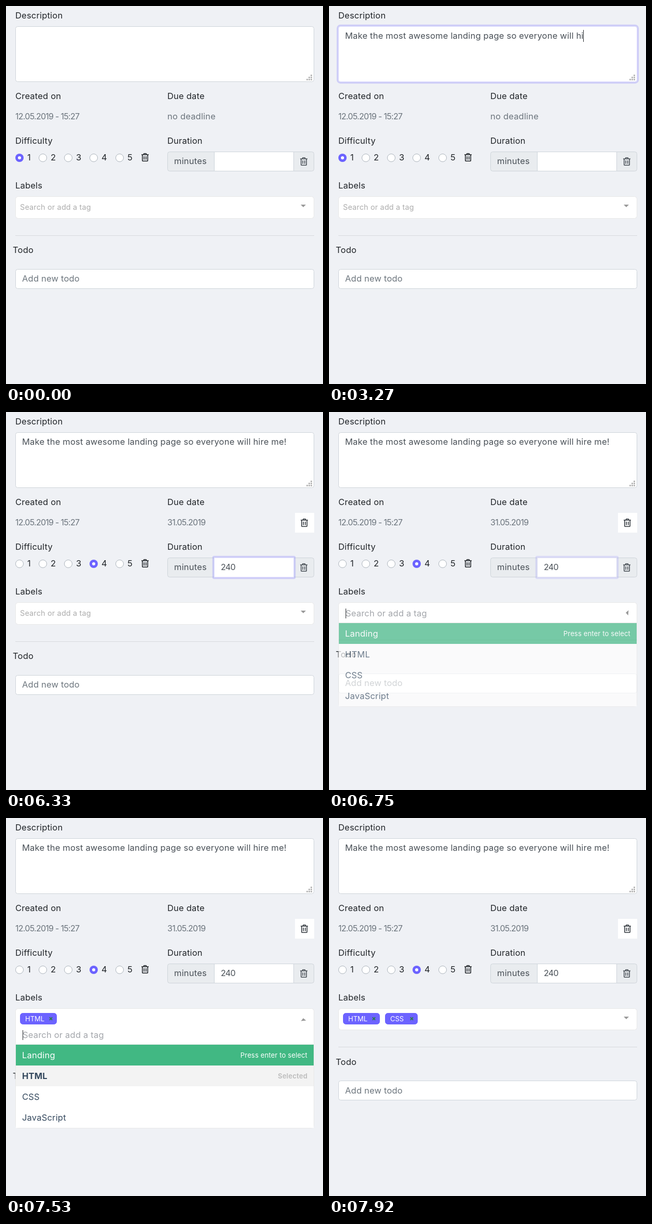
Write an HTML page with a canvas that moves like this. It is 611 px wide and 727 px high and loops after 8000 ms.

```html
<!DOCTYPE html>
<html lang="en">
<head>
<meta charset="utf-8">
<title>Task form</title>
<style>
  html, body { margin: 0; width: 100%; height: 100%; overflow: hidden; background: #eff1f5; }
  canvas { display: block; }
</style>
</head>
<body>
<canvas width="611" height="727"></canvas>
<script>
const page = document.querySelector('canvas').getContext('2d');
const layer = page.canvas.cloneNode().getContext('2d');
let ctx = page;

const LOOP = 8000;
const DARK = '#212529', INK = '#495057', MUTED = '#6c757d', LINE = '#ced4da', ACCENT = '#6c63ff';
const NOTE = 'Make the most awesome landing page so everyone will hire me!';
// [ms, characters typed]
const TYPING = [[240, 0], [1020, 13], [1500, 22], [1860, 29], [2670, 45], [3270, 54], [3510, 59], [3600, 60]];
const OPTIONS = ['Landing', 'HTML', 'CSS', 'JavaScript'];
const LABEL_X = 18, RIGHT_X = 311;

const clamp = x => Math.max(0, Math.min(1, x));
const smooth = x => x * x * (3 - 2 * x);
const during = (t, a, b) => t >= a && t < b;
const fade = (t, on, off, ms = 150, curve = smooth) =>
  curve(clamp((t - on) / ms)) * (1 - curve(clamp((t - off) / ms)));

// the CSS "ease" curve, cubic-bezier(.25, .1, .25, 1)
function ease(x) {
  let s = x;
  for (let i = 0; i < 6; i++) s -= (0.75 * s * (1 - s) + s ** 3 - x) / (0.75 - 1.5 * s + 3 * s * s);
  return 0.3 * s * (1 - s) ** 2 + 3 * s * s * (1 - s) + s ** 3;
}

function text(s, x, y, color = DARK, { size = 16.5, weight = 400, gap = 0.012, align = 'left' } = {}) {
  ctx.font = `${weight} ${size}px Inter, "Open Sans", sans-serif`;
  ctx.letterSpacing = gap * size + 'px';
  ctx.textAlign = align;
  ctx.fillStyle = color;
  ctx.fillText(s, x, y);
  return ctx.measureText(s).width;
}

const digits = (s, x, y, color) => text(s, x, y, color, { size: 16, gap: -0.045 });

function rect(x, y, w, h, color) {
  ctx.fillStyle = color;
  ctx.fillRect(x, y, w, h);
}

function box(x, y, w, h, fill, stroke, r = 4) {
  ctx.beginPath();
  ctx.roundRect(x + 0.5, y + 0.5, w - 1, h - 1, r);
  ctx.fillStyle = fill;
  ctx.fill();
  ctx.lineWidth = 1;
  ctx.strokeStyle = stroke;
  ctx.stroke();
}

// draws a group on its own layer, then blends it as one
function withAlpha(alpha, draw) {
  if (alpha <= 0) return;
  ctx = layer;
  ctx.clearRect(0, 0, 611, 727);
  draw();
  ctx = page;
  ctx.globalAlpha = alpha;
  ctx.drawImage(layer.canvas, 0, 0);
  ctx.globalAlpha = 1;
}

function focusBox(x, y, w, h, amount, r = 4) {
  withAlpha(amount, () => {
    box(x, y, w, h, '#fff', '#e3e2ff', r);
    ctx.beginPath();
    ctx.roundRect(x - 1.6, y - 1.6, w + 3.2, h + 3.2, r + 1.6);
    ctx.lineWidth = 3.2;
    ctx.strokeStyle = 'rgba(108,99,255,.25)';
    ctx.stroke();
  });
}

function disc(x, y, r, color) {
  ctx.beginPath();
  ctx.arc(x, y, r, 0, 7);
  ctx.fillStyle = color;
  ctx.fill();
}

function shape(points, color) {
  ctx.beginPath();
  points.forEach(p => ctx.lineTo(...p));
  ctx.fillStyle = color;
  ctx.fill();
}

function trash(x, y, color) {
  ctx.save();
  ctx.translate(x, y);
  ctx.strokeStyle = color;
  ctx.lineWidth = 1.6;
  ctx.stroke(new Path2D('M-7-5H7M-3-5.2L-2-7.3H2L3-5.2M-5.2-5V6.2Q-5.2 7.2-4.2 7.2H4.2Q5.2 7.2 5.2 6.2V-5M-1.8-2V4.5M1.8-2V4.5'));
  ctx.restore();
}

function typed(t) {
  const i = TYPING.findIndex(p => p[0] > t);
  if (i < 0) return NOTE.length;
  if (i === 0) return 0;
  const [[t0, n0], [t1, n1]] = [TYPING[i - 1], TYPING[i]];
  return Math.floor(n0 + (n1 - n0) * (t - t0) / (t1 - t0) + 0.001);
}

function description(t) {
  text('Description', LABEL_X, 24);
  box(18, 39, 576, 107, '#fff', LINE);
  focusBox(18, 39, 576, 107, fade(t, 180, 4110) * (t >= 240));
  for (let row = 0; row < 3; row++)
    for (let col = 2 - row; col < 3; col++) rect(579 + col * 4, 132 + row * 4, 3, 3, '#b9b9b9');
  const width = text(NOTE.slice(0, typed(t)), 31, 63, INK);
  if (during(t, 240, 3600) || during(t, 3690, 3900)) rect(Math.floor(31 + width), 46, 1, 23, DARK);
}

function dates(t) {
  const picked = t >= 4680;
  text('Created on', LABEL_X, 179);
  digits('12.05.2019 - 15:27', LABEL_X, 218, MUTED);
  text('Due date', RIGHT_X, 179);
  focusBox(RIGHT_X, 194, picked ? 246 : 283, 38, fade(t, 4110, 5250));
  if (!picked) return text('no deadline', RIGHT_X, 218, MUTED);
  digits('31.05.2019', RIGHT_X, 218, MUTED);
  rect(557, 194, 37, 38, '#fff');
  trash(575, 213, '#343a40');
}

function difficulty(t) {
  const chosen = t < 5250 ? 0 : 3;
  text('Difficulty', LABEL_X, 265);
  [26, 71, 120, 169, 219].forEach((x, i) => {
    if (i === 3) focusBox(x - 8, 284, 16, 16, fade(t, 5250, 5730), 8);
    if (i === chosen) {
      disc(x, 292, 8, ACCENT);
      disc(x, 292, 3, '#fff');
    } else box(x - 8, 284, 16, 16, '#fff', '#adb5bd', 7.5);
    text(i + 1, x + 15, 297);
  });
  trash(268, 291, DARK);
}

function duration(t) {
  text('Duration', RIGHT_X, 265);
  box(311, 280, 283, 38, '#e9ecef', LINE);
  box(401, 280, 154, 38, '#fff', LINE, 0);
  text('minutes', 324, 304, INK);
  trash(574, 299, INK);
  focusBox(401, 280, 154, 38, fade(t, 5730, 6690), 0);
  const count = t < 5940 ? 0 : Math.min(3, 1 + Math.floor((t - 5940) / 120));
  const width = digits('240'.slice(0, count), 414, 304, INK);
  if (during(t, 5730, 6330) || during(t, 6540, 6690)) rect(Math.round(414 + width), 287, 1, 23, DARK);
}

function calendar(t) {
  if (!during(t, 4110, 4680)) return;
  const cell = 298 / 7, left = 312, top = 233;
  rect(311, 232, 300, 282, '#ccc');
  rect(312, 233, 298, 280, '#fff');
  text('May 2019', 461, top + 25, DARK, { align: 'center' });
  shape([[327, 253], [337, 247], [337, 259]], '#000');
  shape([[595, 253], [585, 247], [585, 259]], '#000');
  ['Sun', 'Mon', 'Tue', 'Wed', 'Thu', 'Fri', 'Sat'].forEach((d, i) =>
    text(d, left + cell * (i + 0.5), top + 64, DARK, { size: 12, align: 'center' }));
  // the pointer glides from the field down to the last day
  const k = clamp((t - 4150) / 290), px = 430 + 116 * k, py = 230 + 263 * k;
  for (let day = 1; day <= 31; day++) {
    const x = left + (day + 2) % 7 * cell, y = top + 80 + Math.floor((day + 2) / 7) * 40;
    if (during(px, x, x + cell) && during(py, y, y + 40)) box(Math.round(x), y, 43, 40, '#fff', '#4bd', 0);
    text(day, x + cell / 2, y + 26, DARK, { size: 16, align: 'center', gap: -0.03 });
  }
}

function tag(name, x, w) {
  box(x, 375, w, 22, ACCENT, ACCENT, 5);
  text(name, x + 10, 391, '#fff', { size: 13, gap: 0 });
  const cx = x + w - 11.5;
  ctx.beginPath();
  for (const s of [-1, 1]) {
    ctx.moveTo(cx - 2.6, 386 - 2.6 * s);
    ctx.lineTo(cx + 2.6, 386 + 2.6 * s);
  }
  ctx.lineWidth = 2;
  ctx.strokeStyle = '#2a7a4c';
  ctx.stroke();
}

function option(name, y, hot, chosen) {
  const [fill, color, hint, hintColor] =
    hot && chosen ? ['#ff6a6a', '#fff', 'Press enter to remove', '#fff'] :
    hot ? ['#41b883', '#fff', 'Press enter to select', '#fff'] :
    chosen ? ['#f3f3f3', '#35495e', 'Selected', '#c0c0c0'] : ['#fff', '#35495e', '', ''];
  const weight = chosen ? 700 : 400;
  rect(19, y, 574, 40, fill);
  text(name, 31, y + 26, color, { weight });
  text(hint, 581, y + 25, hintColor, { size: 13, weight, align: 'right' });
}

function labelsAndTodo(t) {
  const tags = t >= 7740 ? 2 : t >= 7110 ? 1 : 0;
  const open = during(t, 6690, 7110) || during(t, 7380, 7740);
  const shown = ms => Math.max(fade(t, 6690, 7110, ms, ease), fade(t, 7380, 7740, ms, ease));
  const height = open ? (tags ? 70 : 40) : (tags ? 42 : 43);
  const bottom = 366 + height, shift = height - 43;
  const textShift = shift === -1 ? 0 : shift;

  rect(18, 441 + shift, 576, 1, '#d7d9dd');
  text('Todo', 13, 475 + textShift);
  box(18, 506 + shift, 576, 38, '#fff', LINE);
  text('Add new todo', 31, 530 + textShift, MUTED);

  text('Labels', LABEL_X, 351);
  box(18, 366, 576, height, '#fff', '#e8e8e8', open ? [5, 5, 0, 0] : 5);
  if (tags > 0) tag('HTML', 27, 71);
  if (tags > 1) tag('CSS', 108, 63);
  if (open) {
    text('Search or add a tag', 32, bottom - 13, '#a3a6ab');
    rect(32, bottom - 28, 1, 19, DARK);
  } else if (!tags) text('Search or add a tag', 27, 392, '#adadad', { size: 14.4 });

  ctx.save();
  ctx.translate(573, 386);
  ctx.rotate(Math.PI * shown(200));
  shape([[-5, -4], [5, -4], [0, 1]], '#999');
  ctx.restore();

  const hot = t < 7080 ? 0 : t < 7380 ? 1 : t < 7590 ? 0 : t < 7650 ? 1 : 2;
  withAlpha(shown(150), () => {
    ctx.beginPath();
    ctx.roundRect(18.5, bottom - 0.5, 575, 161, [0, 0, 5, 5]);
    ctx.lineWidth = 1;
    ctx.strokeStyle = '#e8e8e8';
    ctx.stroke();
    OPTIONS.forEach((name, i) => option(name, bottom + i * 40, i === hot, i > 0 && i <= tags));
  });
}

function frame(now) {
  const t = now % LOOP;
  rect(0, 0, 611, 727, '#eff1f5');
  for (const part of [description, dates, difficulty, duration, labelsAndTodo, calendar]) part(t);
  requestAnimationFrame(frame);
}
requestAnimationFrame(frame);
</script>
</body>
</html>
```
